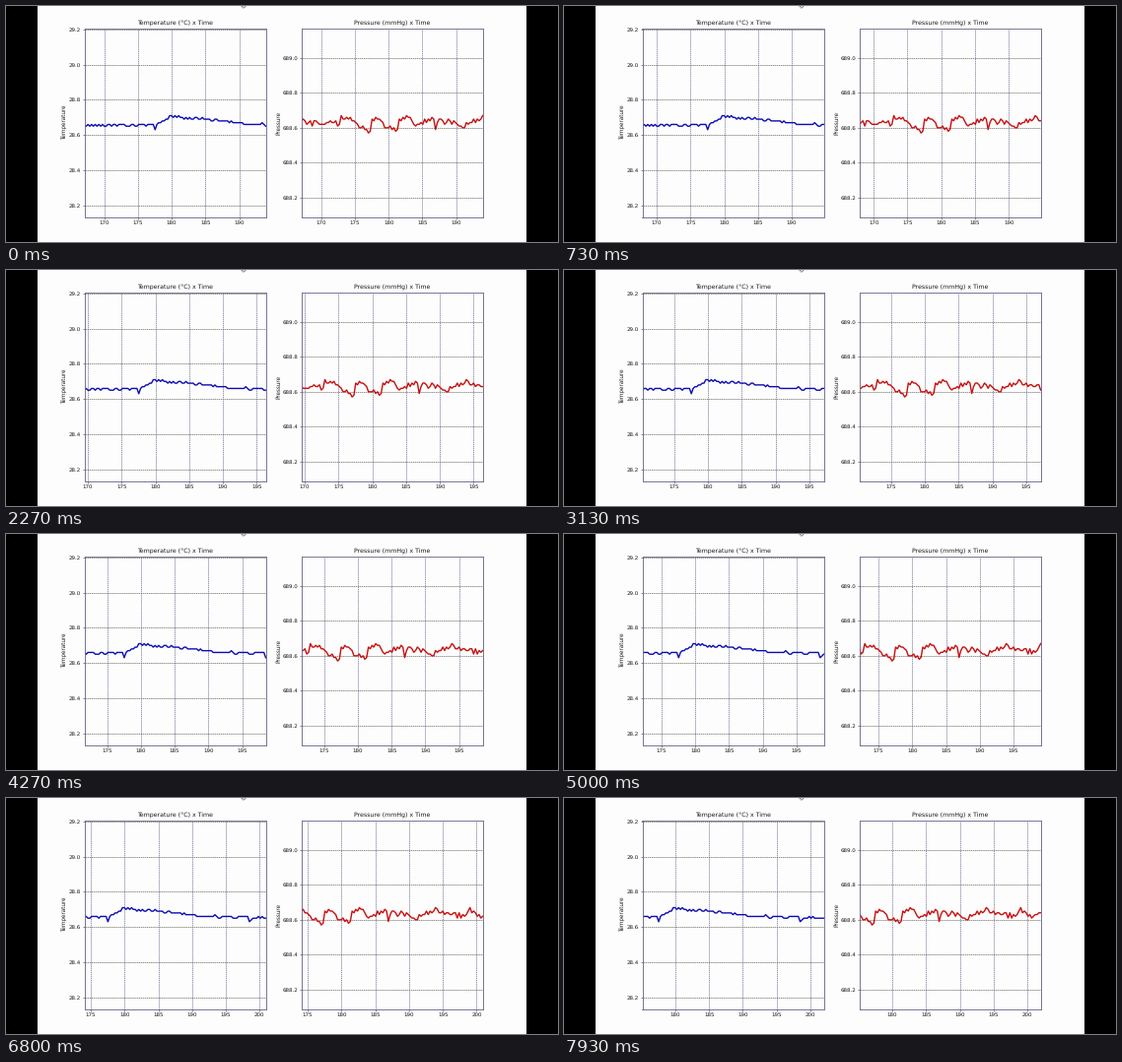
A matplotlib script that plays this animation: 560x240 px, repeating every 8 s.

```python
import numpy as np
import matplotlib.pyplot as plt
from matplotlib.animation import FuncAnimation
from matplotlib.patches import Rectangle
from matplotlib.ticker import FormatStrFormatter, MultipleLocator

W, H, DPI = 560, 240, 80
FRAMES, LOOP = 120, 8000
T0, DT, SPAN, STEPS = 167.07, 0.2685, 100, 30   # first time, spacing, window, updates
PERIOD, PHASE = 266, 0.97                       # ms between samples, start offset
PAPER, INK = "#fdfdfd", "#161616"
TOP, BOTTOM, WIDTH = 23, 215, 184

plt.rcParams["font.family"] = "DejaVu Sans"
plt.rcParams["text.hinting"] = "none"


def px(v):
    return v * 72 / DPI


def readings(base, keys, jitter, seed):
    """Sensor values in steps of 0.01: a trend through key points plus jitter."""
    at, level = zip(*keys)
    k = np.arange(SPAN + STEPS + 1)
    noise = np.random.default_rng(seed).uniform(-jitter, jitter, k.size)
    noise[list(at)] = 0
    return base + np.round(np.interp(k, at, level) + noise) / 100


temp = readings(28, [(0, 65.3), (38, 65.6), (39, 63), (40, 66), (45, 69.4), (50, 71),
                     (53, 70), (66, 69), (79, 68), (88, 66.3), (116, 65.5),
                     (117, 63), (120, 65), (130, 65.4)], 0.8, 4)
press = readings(688, [(0, 63.5), (21, 62), (22, 67), (28, 64.5), (38, 58), (39, 64.6),
                       (42, 65), (47, 60.5), (53, 59), (54, 65), (60, 66), (62, 62),
                       (73, 65), (74, 59), (75, 63), (82, 64), (89, 60.5), (100, 67),
                       (102, 64), (116, 62), (119, 67), (123, 61.5), (130, 64.5)],
                 1.6, 7)
times = T0 + DT * np.arange(temp.size)

fig = plt.figure(figsize=(W / DPI, H / DPI), dpi=DPI, facecolor="black")
stage = fig.add_axes([0, 0, 1, 1], xlim=(0, W), ylim=(H, 0))
stage.axis("off")
stage.add_patch(Rectangle((32, 0), 496, H, fc=PAPER, lw=0))
# lower tip of a label cut off by the top edge
stage.plot([238.8, 239.6, 240.4], [0, 1.2, 0.6], color="#777777", lw=px(0.8))
stage.plot([240.6, 241.6, 243], [2, 1.8, 0], color="#666666", lw=px(0.8))


def panel(left, title, name, name_x, ylim, ticks, color):
    ax = fig.add_axes([left / W, 1 - BOTTOM / H, WIDTH / W, (BOTTOM - TOP) / H],
                      facecolor=PAPER)
    ax.set_ylim(*ylim)
    ax.set_yticks(ticks)
    ax.yaxis.set_major_formatter(FormatStrFormatter("%.1f"))
    ax.xaxis.set_major_locator(MultipleLocator(5))
    ax.tick_params(length=px(2), width=px(0.5), pad=px(1.4), labelsize=px(5.5),
                   color=INK, labelcolor=INK)
    dots = dict(lw=px(0.8), ls=(0, (1.8, 0.8)))
    ax.grid(axis="x", color="#8484a4", **dots)
    ax.grid(axis="y", color="#7c7c74", **dots)
    ax.set_axisbelow(True)
    for spine in ax.spines.values():
        spine.set(color="#6a6a8c", linewidth=px(0.9))
    stage.text(left + WIDTH / 2, 19.2, title, size=px(6.3), color=INK,
               ha="center", va="baseline")
    stage.text(name_x, 118.5, name, size=px(5.6), color=INK, rotation=90,
               ha="center", va="center")
    line, = ax.plot([], [], color=color, lw=px(1.4))
    return ax, line


panels = [
    (*panel(79.5, "Temperature (°C) x Time", "Temperature", 59.6, (28.1306, 29.2056),
            np.arange(28.2, 29.21, 0.2).round(1), "#0c0cb8"), temp),
    (*panel(299.6, "Pressure (mmHg) x Time", "Pressure", 277, (688.0848, 689.1698),
            np.arange(688.2, 689.01, 0.2).round(1), "#c81010"), press),
]


def draw(i):
    n = int(i * LOOP / FRAMES / PERIOD + PHASE)
    window = slice(n, n + SPAN + 1)
    for ax, line, data in panels:
        line.set_data(times[window], data[window])
        ax.set_xlim(times[n], times[n] + DT * SPAN)
    return [line for _, line, _ in panels]


anim = FuncAnimation(fig, draw, frames=FRAMES, interval=LOOP / FRAMES,
                     init_func=lambda: draw(0), repeat=True, blit=False)
plt.show()
```
